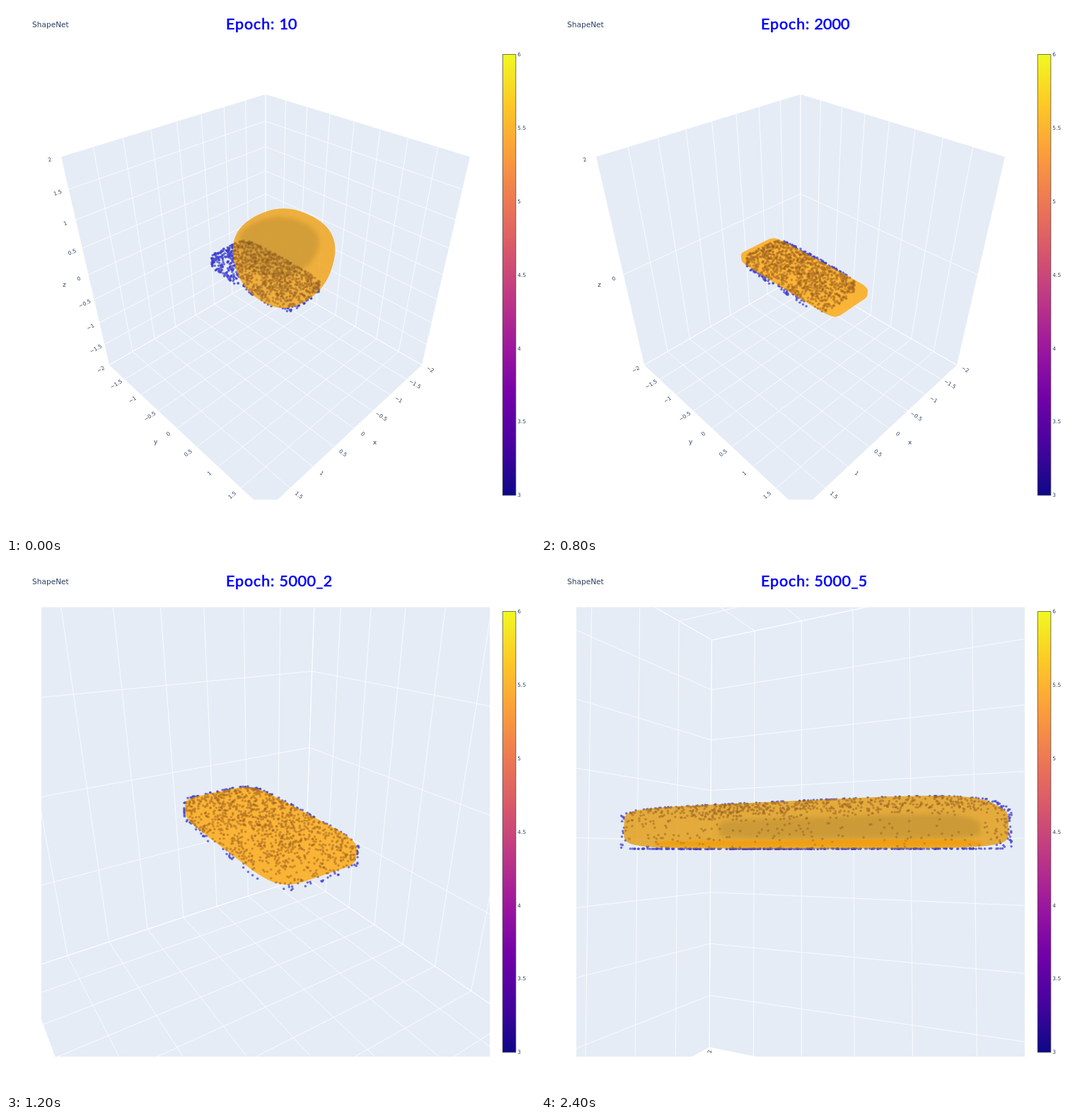
Recreate the animation shown at these times as an HTML page with a canvas. Size 748x748 px, loop 2800 ms.

```html
<!DOCTYPE html>
<html lang="en">
<head>
<meta charset="utf-8">
<title>ShapeNet</title>
<style>
html, body { margin: 0; width: 100%; height: 100%; overflow: hidden; background: #fff; }
canvas { display: block; }
</style>
</head>
<body>
<canvas id="stage" width="748" height="748"></canvas>
<script>
const ctx = document.getElementById('stage').getContext('2d');
const INK = '#2a3f5f', AMBER = 'rgba(255,165,0,.78)', OCHRE = 'rgba(228,156,14,.8)';
const DIM = 'rgba(150,115,45,.3)', GLOW = 'rgba(247,155,0,.7)';
const CENTER = [367, 380], FOCAL = 768, NEAR = 0.02, LOOP = 2800;
const rad = deg => deg * Math.PI / 180;
const mix = (a, b, k) => a.map((v, i) => v + (b[i] - v) * k);

// Cameras: azimuth, elevation, distance, visible back faces, z tick step
const camera = (az, el, dist, back, zStep) => ({ az: rad(az), el: rad(el), dist, back, zStep });
const homeFine = camera(45, 35.264, 2.165, [-1, -1, -1], 0.5);
const homeCoarse = { ...homeFine, zStep: 2 };
const closeUp = camera(57.1, 24.3, 1.206, [-1, -1, -1], 1);
const front = camera(92, 11.24, 0.971, [-1, -1, -1], 0.5);
const sideA = camera(132.3, 1.08, 0.657, [1, -1, -1], 0.5);
const sideB = camera(206.8, -1.97, 0.662, [1, 1, 1], 0.5);

// Superellipsoids: centre xyz, half size xyz, power, taper
const egg = [-0.05, 0.05, 0.07, 0.182, 0.182, 0.182, 2.4, 0.15];
const plate = [-0.01, 0.01, -0.002, 0.1, 0.322, 0.012, 14, 0];
const car = [0, -0.01, 0.005, 0.109, 0.223, 0.0255, 6, 0];

// Patches: colour, blur, scale x, scale y, shift x, shift y
const poses = [
  { at: 0, epoch: '10', cam: homeFine, body: egg, fill: 'rgba(240,160,15,.8)',
    patches: [[DIM, 3, 0.78, 0.6, -7, -16]] },
  { at: 200, epoch: '100', cam: homeFine, body: mix(egg, plate, 0.5), fill: 'rgba(240,160,15,.8)' },
  { at: 400, epoch: '500', cam: homeCoarse, body: mix(egg, plate, 0.85), fill: AMBER },
  { at: 600, epoch: '1000', cam: homeCoarse, body: plate, fill: AMBER },
  { at: 800, epoch: '2000', cam: homeCoarse, body: mix(plate, car, 0.5), fill: AMBER },
  { at: 1000, epoch: '5000_1', cam: homeCoarse, body: car, fill: AMBER },
  { at: 1200, epoch: '5000_2', cam: closeUp, body: car, fill: AMBER },
  { at: 1600, epoch: '5000_3', cam: front, body: car, fill: AMBER,
    patches: [[DIM, 3, 0.5, 0.18, 4, -36], [GLOW, 0.6, 0.6, 0.03, 8, -20], [GLOW, 0.6, 0.71, 0.04, 0, 33]],
    notes: [['−2', 125, 569, 0], ['−1.5', 102, 598, 0], ['−1', 75, 632, 0], ['−0.5', 43, 672, 0]] },
  { at: 2000, epoch: '5000_4', cam: sideA, body: car, fill: OCHRE,
    patches: [[DIM, 3, 0.3, 0.25, -175, -14], [DIM, 3, 0.3, 0.3, 183, 3], [GLOW, 1, 0.43, 0.18, -87, 25]],
    notes: [['−2', 348, 86, 90], ['−1.5', 295, 65, 90]] },
  { at: 2400, epoch: '5000_5', cam: sideB, body: car, fill: OCHRE,
    patches: [[DIM, 3, 0.68, 0.45, 47, 6], [GLOW, 1, 0.85, 0.12, 3, 29]],
    notes: [['2', 239, 691, -90]] }
];

function makeCloud(count) {
  let seed = 7;
  const rand = () => (seed = (seed * 16807) % 2147483647) / 2147483647;
  const points = [];
  while (points.length < count) {
    let u = rand() * 2 - 1, v = rand() * 2 - 1;
    const rho = (u ** 6 + v ** 6) ** (1 / 6), kind = rand();
    if (rho > 1) continue;
    let z = 0.031 - 0.008 * rho ** 6;
    if (kind > 0.82) {
      u /= rho; v /= rho;
      z = -0.02 + 0.04 * rand();
    } else if (kind > 0.58) z = -0.0208;
    points.push([u * 0.111, v * 0.226 - 0.01, z]);
  }
  return points;
}
const cloud = makeCloud(1200);

function toView({ az, el, dist }, [x, y, z]) {
  const ca = Math.cos(az), sa = Math.sin(az), ce = Math.cos(el), se = Math.sin(el);
  const along = x * ca + y * sa;
  return [y * ca - x * sa, z * ce - along * se, dist - along * ce - z * se];
}
const toScreen = ([x, y, d]) => [CENTER[0] + FOCAL * x / d, CENTER[1] - FOCAL * y / d];
const project = (cam, p) => toScreen(toView(cam, p));

function tracePath(pts) {
  pts.forEach(([x, y], i) => i ? ctx.lineTo(x, y) : ctx.moveTo(x, y));
}

// Projects a polygon or segment, cut at the near plane
function tracePoly(cam, corners) {
  const pts = corners.map(p => toView(cam, p)), cut = [];
  pts.forEach((a, i) => {
    const b = pts[(i + 1) % pts.length];
    if (a[2] >= NEAR) cut.push(a);
    if ((a[2] < NEAR) !== (b[2] < NEAR)) cut.push(mix(a, b, (NEAR - a[2]) / (b[2] - a[2])));
  });
  tracePath(cut.map(toScreen));
}

function point(...pairs) {
  const p = [0, 0, 0];
  for (const [axis, value] of pairs) p[axis] = value;
  return p;
}

function drawBox(cam) {
  ctx.fillStyle = '#e5ecf6';
  for (let k = 0; k < 3; k++) {
    const i = (k + 1) % 3, j = (k + 2) % 3;
    ctx.beginPath();
    tracePoly(cam, [[-1, -1], [1, -1], [1, 1], [-1, 1]].map(([a, b]) =>
      point([k, cam.back[k] / 2], [i, a / 2], [j, b / 2])));
    ctx.fill();
  }
  ctx.beginPath();
  for (let k = 0; k < 3; k++) {
    const step = k === 2 ? cam.zStep : 0.5;
    for (let t = -2; t <= 2; t += step) {
      for (const [i, j] of [[(k + 1) % 3, (k + 2) % 3], [(k + 2) % 3, (k + 1) % 3]]) {
        tracePoly(cam, [-0.5, 0.5].map(e => point([k, t / 4], [i, cam.back[i] / 2], [j, e])));
      }
    }
  }
  ctx.strokeStyle = 'rgba(255,255,255,.8)';
  ctx.lineWidth = 1;
  ctx.stroke();
}

function convexHull(pts) {
  const sorted = [...pts].sort((a, b) => a[0] - b[0] || a[1] - b[1]);
  const chain = list => {
    const out = [];
    for (const p of list) {
      while (out.length > 1) {
        const [a, b] = out.slice(-2);
        if ((b[0] - a[0]) * (p[1] - a[1]) > (b[1] - a[1]) * (p[0] - a[0])) break;
        out.pop();
      }
      out.push(p);
    }
    return out.slice(0, -1);
  };
  return [...chain(sorted), ...chain(sorted.reverse())];
}

// Silhouette of a superellipsoid, sampled along rays through a cube's faces
function silhouette(cam, [cx, cy, cz, hx, hy, hz, power, taper]) {
  const pts = [], N = 10;
  for (let i = -N; i <= N; i++) for (let j = -N; j <= N; j++) for (const side of [-N, N]) {
    for (const ray of [[i, j, side], [i, side, j], [side, i, j]]) {
      const norm = ray.reduce((sum, v) => sum + Math.abs(v) ** power, 0) ** (1 / power);
      const [x, y, z] = ray.map(v => v / norm), wide = 1 + taper * z;
      pts.push(project(cam, [cx + hx * x * wide, cy + hy * y * wide, cz + hz * z]));
    }
  }
  return convexHull(pts);
}

function fillShape(pts, color, blur = 0) {
  ctx.filter = blur ? `blur(${blur}px)` : 'none';
  ctx.beginPath();
  tracePath(pts);
  ctx.fillStyle = color;
  ctx.fill();
  ctx.filter = 'none';
}

function drawCloud(cam, color) {
  ctx.fillStyle = color;
  for (const p of cloud) {
    ctx.beginPath();
    ctx.arc(...project(cam, p), 1.75, 0, 7);
    ctx.fill();
  }
}

function drawBody(cam, body, fill, patches) {
  const outline = silhouette(cam, body);
  const middle = axis => {
    const values = outline.map(p => p[axis]);
    return (Math.min(...values) + Math.max(...values)) / 2;
  };
  const mx = middle(0), my = middle(1);
  drawCloud(cam, 'rgba(62,62,205,.72)');
  fillShape(outline, fill);
  ctx.save();
  ctx.clip();
  for (const [color, blur, sx, sy, dx, dy] of patches) {
    fillShape(outline.map(([x, y]) => [mx + dx + (x - mx) * sx, my + dy + (y - my) * sy]), color, blur);
  }
  drawCloud(cam, 'rgba(130,80,25,.2)');
  ctx.restore();
}

function label(text, x, y, angle = 0, size = 7.45, align = 'center') {
  ctx.save();
  ctx.translate(x, y);
  ctx.rotate(angle);
  ctx.font = `${size}px "DejaVu Sans", sans-serif`;
  ctx.textAlign = align;
  ctx.textBaseline = 'middle';
  ctx.fillStyle = INK;
  ctx.fillText(text, 0, 0);
  ctx.restore();
}

function drawTicks(cam) {
  const tick = (value, p, outAxis) => {
    const out = p.slice();
    out[outAxis] += 0.041;
    const a = project(cam, p), b = project(cam, out);
    label(String(value).replace('-', '−'), b[0], b[1], Math.atan((b[1] - a[1]) / (b[0] - a[0])));
  };
  for (let t = -2; t <= 2; t += 0.5) {
    tick(t, [t / 4, 0.5, -0.5], 1);
    if (t > -2) tick(t, [0.5, t / 4, -0.5], 0);
    if (t % cam.zStep === 0) tick(t, [0.5, -0.5, t / 4], 0);
  }
  label('x', 521.5, 618, 0, 8.7);
  label('y', 211.5, 617, 0, 8.7);
  label('z', 82.5, 394.5, 0, 8.7);
}

function drawColorBar() {
  const plasma = ['#0d0887', '#46039f', '#7201a8', '#9c179e', '#bd3786', '#d8576b', '#ed7953', '#fb9f3a', '#fdca26', '#f0f921'];
  const ramp = ctx.createLinearGradient(0, 692, 0, 68);
  plasma.forEach((color, i) => ramp.addColorStop(i / 9, color));
  ctx.fillStyle = ramp;
  ctx.fillRect(702, 68, 19, 624);
  ctx.strokeStyle = '#555';
  ctx.lineWidth = 0.8;
  ctx.strokeRect(702.3, 68.5, 18.6, 623.4);
  for (let i = 0; i <= 6; i++) label(String(6 - i / 2), 723.3, 69 + 103.9 * i, 0, 7.45, 'left');
}

function drawTitle(epoch) {
  label('ShapeNet', 37, 27.5, 0, 10.6, 'left');
  ctx.font = '21.5px Lato, sans-serif';
  ctx.textAlign = 'left';
  ctx.textBaseline = 'alphabetic';
  ctx.fillStyle = ctx.strokeStyle = '#00f';
  ctx.lineWidth = 0.6;
  ctx.lineJoin = 'round';
  const write = (text, x, spacing) => {
    ctx.letterSpacing = spacing;
    ctx.fillText(text, x, 33);
    ctx.strokeText(text, x, 33);
  };
  write('Epoch:', 311, '0.9px');
  write(epoch, 386.5, epoch.includes('_') ? '0.5px' : '0px');
  ctx.letterSpacing = '0px';
}

function draw({ cam, body, fill, epoch, patches = [], notes = [] }) {
  ctx.fillStyle = '#fff';
  ctx.fillRect(0, 0, 748, 748);
  ctx.save();
  ctx.beginPath();
  ctx.rect(50, 62.5, 634, 635.5);
  ctx.clip();
  drawBox(cam);
  drawBody(cam, body, fill, patches);
  if (cam.dist > 2) drawTicks(cam);
  for (const [text, x, y, angle] of notes) label(text, x, y, rad(angle));
  ctx.restore();
  drawColorBar();
  drawTitle(epoch);
}

let shown;
function tick() {
  const time = performance.now() % LOOP;
  const pose = poses.findLast(p => p.at <= time);
  if (pose !== shown) draw(shown = pose);
  requestAnimationFrame(tick);
}
tick();
</script>
</body>
</html>
```
